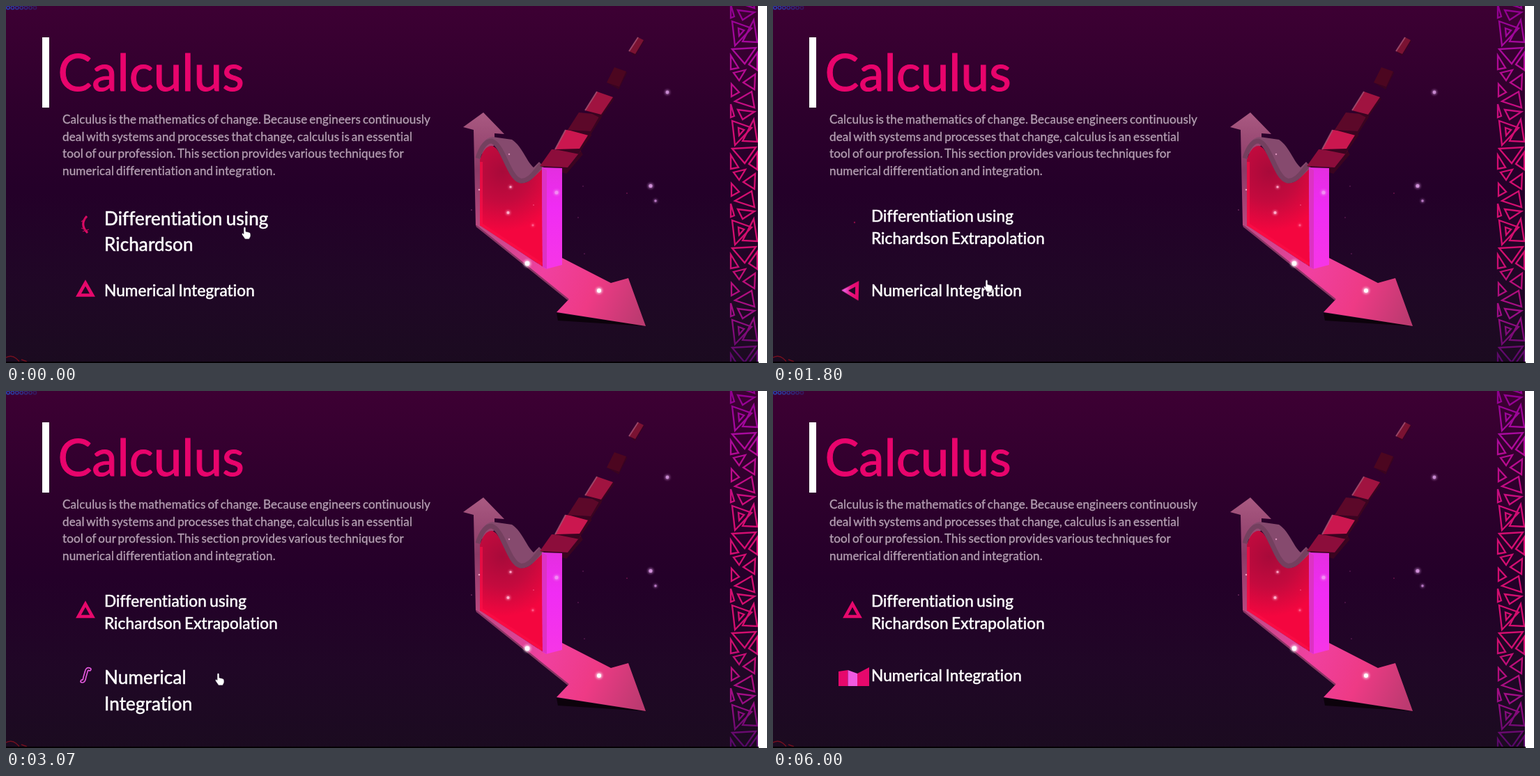
Write an HTML page that moves like this. It is 1092 px wide and 513 px high and loops after 6070 ms.

```html
<!DOCTYPE html>
<html lang="en">
<head>
<meta charset="utf-8">
<title>Calculus</title>
<style>
  html, body { margin: 0; width: 100%; height: 100%; overflow: hidden; background: #fff; }
  svg { display: block; width: 1092px; height: 513px; }
  text { font-family: Lato, "Open Sans", sans-serif; font-variant-ligatures: none; }
  .title { font-size: 73px; fill: #e8046c; stroke: #e8046c; stroke-width: 1.1; }
  .body { font-size: 17.1px; letter-spacing: .1px; word-spacing: -1.5px; fill: #b5a0b3; stroke: #b5a0b3; stroke-width: .3; }
  .item { font-size: 22.6px; letter-spacing: .1px; word-spacing: -1.5px; fill: #fff; stroke: #fff; stroke-width: .55; }
  .big { font-size: 26.1px; }
  .pink { fill: #e6086c; }
  .line { fill: none; stroke: #e6086c; stroke-width: 4.6; }
</style>
</head>
<body>
<svg viewBox="0 0 1092 513">
  <defs>
    <linearGradient id="bg" x2="0" y2="1">
      <stop stop-color="#3d0033"/><stop offset=".3" stop-color="#2d002c"/>
      <stop offset=".52" stop-color="#240029"/><stop offset=".78" stop-color="#200726"/>
      <stop offset="1" stop-color="#1b0b20"/>
    </linearGradient>
    <linearGradient id="strip" gradientUnits="userSpaceOnUse" x1="0" y1="0" x2="0" y2="511">
      <stop stop-color="#9a009c"/><stop offset=".12" stop-color="#b80cae"/>
      <stop offset=".36" stop-color="#ec0f7c"/><stop offset=".7" stop-color="#ec1078"/>
      <stop offset=".86" stop-color="#b00e94"/><stop offset="1" stop-color="#5c0870"/>
    </linearGradient>
    <linearGradient id="axis" gradientUnits="userSpaceOnUse" x1="0" y1="153" x2="0" y2="316">
      <stop stop-color="#aa5a82"/><stop offset=".5" stop-color="#8a3a66"/><stop offset="1" stop-color="#b8487f"/>
    </linearGradient>
    <radialGradient id="panel" gradientUnits="userSpaceOnUse" cx="712" cy="238" r="86">
      <stop stop-color="#a80a3a"/><stop offset=".5" stop-color="#c40a3e"/><stop offset="1" stop-color="#f4063f"/>
    </radialGradient>
    <linearGradient id="base" gradientUnits="userSpaceOnUse" x1="680" y1="330" x2="915" y2="440">
      <stop stop-color="#c04a86"/><stop offset=".4" stop-color="#f040a0"/>
      <stop offset=".7" stop-color="#ee3a85"/><stop offset="1" stop-color="#bc3a70"/>
    </linearGradient>
    <linearGradient id="bar" gradientUnits="userSpaceOnUse" x1="0" y1="232" x2="0" y2="377">
      <stop stop-color="#e42ee0"/><stop offset=".4" stop-color="#f02cf4"/><stop offset="1" stop-color="#f636e6"/>
    </linearGradient>
    <linearGradient id="spin">
      <stop stop-color="#e85ad8"/><stop offset=".5" stop-color="#ea1480"/><stop offset="1" stop-color="#e6086c"/>
    </linearGradient>
    <filter id="soft" x="-1" y="-1" width="3" height="3"><feGaussianBlur stdDeviation="1.6"/></filter>
  </defs>

  <rect width="1080" height="513" fill="url(#bg)"/>
  <g id="corner" fill="none"></g>
  <g id="pattern" fill="none" stroke="url(#strip)" stroke-width="2.3" opacity=".88"></g>
  <rect x="1079" width="13" height="513" fill="#fff"/>
  <rect y="511" width="1080" height="2" fill="#050005"/>

  <rect x="52" y="45" width="10" height="101" fill="#fff"/>
  <text class="title" x="74.5" y="122">Calculus</text>
  <g class="body">
    <text x="81" y="169">Calculus is the mathematics of change. Because engineers continuously</text>
    <text x="81" y="193.5">deal with systems and processes that change, calculus is an essential</text>
    <text x="81" y="218">tool of our profession. This section provides various techniques for</text>
    <text x="81" y="242.5">numerical differentiation and integration.</text>
  </g>

  <g id="art">
    <path fill="url(#axis)" d="M656 174L685 153L715 184L701 183V200L681 214V320L674 315L671 178Z"/>
    <path fill="#864a6e" d="M676 216C681 198 688 189 698 188L726 192C741 202 746 222 757 232L765 224L772 232C758 250 745 256 735 250C722 238 716 205 694 194Z"/>
    <path fill="url(#panel)" d="M680 316V221C684 208 690 200 698 201C713 206 719 250 738 254C752 256 760 242 771 233V375Z"/>
    <path fill="none" stroke="#ff1048" stroke-width="4" opacity=".6" d="M682 224V314L769 371"/>
    <path fill="none" stroke="#74405f" stroke-width="7" d="M677 219C682 202 688 194 697 194C714 200 721 247 738 251C751 253 759 238 768 228"/>
    <path fill="#0c020b" d="M790 441L918 460L792 452Z"/>
    <path fill="url(#base)" d="M674 315L681 316L771 375L798 362L868 398L893 391L918 460L790 440L807 422Z"/>
    <path fill="none" stroke="#8a3564" stroke-width="2.5" d="M675 316L807 422"/>
    <g id="blocks"></g>
    <path fill="url(#bar)" d="M769 232L798 233V372L775 378L770 375Z"/>
    <path fill="#dd32c4" d="M769 232L776 236V378L770 375Z"/>
    <g id="dust"></g>
  </g>

  <g class="item" id="first"><text x="141" y="310">Differentiation using</text><text x="141" y="342">Richardson Extrapolation</text></g>
  <g transform="translate(141 278)"><g class="item big" id="firstBig"><text y="37">Differentiation using</text><text y="74">Richardson</text></g></g>
  <g class="item" id="second"><text x="141" y="417">Numerical Integration</text></g>
  <g transform="translate(141 391)"><g class="item big" id="secondBig"><text y="30">Numerical</text><text y="67.5">Integration</text></g></g>

  <g transform="translate(114 314)">
    <g id="tri1"><path class="line" d="M0 -8L10 10H-10Z"/></g>
    <g id="scribble">
      <path fill="none" stroke="#dc0a64" stroke-width="3" d="M2 -12Q-9 0 3 12"/>
      <path fill="none" stroke="#c00a58" stroke-width="1.2" d="M-6 -4L2 -10M-6 5L3 9M-4 10L5 7"/>
    </g>
    <g id="square"><rect class="pink" x="-6" y="-6" width="12" height="12"/></g>
    <circle id="speck" cx="3" cy="-3" r="1.2" fill="#8a0a44"/>
    <g id="pair">
      <rect class="pink" x="-3" y="-7" width="6" height="6"/>
      <rect class="pink" x="-3" y="2" width="6" height="6"/>
    </g>
  </g>

  <g transform="translate(114 410)">
    <g id="tri2">
      <path class="line" d="M0 -12L10 5.5H-10Z"/>
      <path id="tint" class="line" style="stroke:url(#spin)" transform="rotate(90)" d="M-12 0L5.5 -10V10Z"/>
    </g>
  </g>
  <g id="bars">
    <path class="pink"/><path fill="#f05ae0"/><path class="pink"/>
  </g>
  <g id="integral" fill="none" stroke-linecap="round">
    <path stroke="#e25ade" stroke-width="5.4" d="M109 417Q112 418 113 411L115 404Q116 398 120 400"/>
    <path stroke="#260525" stroke-width="2" d="M109 417Q112 418 113 411L115 404Q116 398 120 400"/>
  </g>

  <g id="cursor">
    <path fill="#fff" stroke="#22102a" stroke-width=".7" d="M3 1.5Q4.5 -.5 6 1.5V7L11 8.2Q13 8.8 13 11V14L11 18H5L.5 11.5Q0 9.5 1.5 9.2L3 10.5Z"/>
  </g>
</svg>
<script>
const LOOP = 6070;
const get = id => document.getElementById(id);

function add(parent, tag, attrs) {
  const el = document.createElementNS('http://www.w3.org/2000/svg', tag);
  for (const key in attrs) el.setAttribute(key, attrs[key]);
  get(parent).append(el);
  return el;
}

// Rows are [milliseconds, style]; the ends are held.
function play(el, rows, easing = 'linear') {
  const all = [...rows];
  const last = rows[rows.length - 1];
  if (rows[0][0] > 0) all.unshift([0, rows[0][1]]);
  if (last[0] < LOOP) all.push([LOOP, last[1]]);
  const run = el.animate(
    all.map(([t, style]) => ({ offset: t / LOOP, easing, ...style })),
    { duration: LOOP, iterations: Infinity });
  run.startTime = 0;
}

// Visible only inside the given [from, to] spans.
function show(id, ...spans) {
  const rows = spans[0][0] > 0 ? [[0, { opacity: 0 }]] : [];
  for (const [from, to] of spans) {
    rows.push([from, { opacity: 1 }]);
    if (to < LOOP) rows.push([to, { opacity: 0 }]);
  }
  play(get(id), rows, 'step-end');
}

const scale = (id, rows, easing) =>
  play(get(id), rows.map(([t, s]) => [t, { transform: `scale(${s})` }]), easing);

// Triangle border, repeated down the edge
const tile = [
  [3, 2, 31, 12, 7, 37], [34, 0, 39, 32, 18, 31], [3, 42, 37, 40, 21, 63],
  [1, 51, 12, 69, 1, 71], [27, 64, 39, 47, 39, 72], [5, 76, 22, 72, 13, 87],
  [19, 90, 36, 78, 35, 100], [2, 92, 13, 104, 2, 110], [7, 117, 31, 103, 35, 126],
  [11, 129, 35, 132, 18, 143], [1, 121, 6, 138, 1, 140], [12, 12, 20, 15, 13, 23]
];
for (let top = -123; top < 511; top += 143)
  for (const [a, b, c, d, e, f] of tile)
    add('pattern', 'path', {
      d: `M${1039 + a} ${top + b}L${1039 + c} ${top + d}L${1039 + e} ${top + f}Z`
    });

for (let i = 0; i < 7; i++)
  add('corner', 'circle', { cx: 3 + i * 6.4, cy: 2.5, r: 2.2, stroke: '#2947b0', 'stroke-width': 1.6, opacity: .95 - i * .1 });
add('corner', 'path', { d: 'M0 505Q8 501 14 506T18 511M22 508L30 511', stroke: '#74101f', 'stroke-width': 1.5 });

// Blocks: four top corners and a colour
const blocks = [
  [783, 206, 825, 208, 806, 232, 766, 230, '#8c0d3b'],
  [803, 178, 838, 181, 823, 205, 788, 206, '#cb174f'],
  [822, 153, 853, 156, 839, 180, 806, 178, '#5c0829'],
  [848, 123, 871, 131, 854, 156, 831, 150, '#a01340'],
  [873, 88, 890, 94, 880, 116, 862, 110, '#4c0620'],
  [907, 45, 915, 49, 903, 69, 894, 65, '#7a1232']
];
blocks.forEach(([a, b, c, d, e, f, g, h, fill], i) => {
  const k = 9 - i * 1.3;
  add('blocks', 'path', { fill: '#3a0420', d: `M${c} ${d}l${k * .3} ${k * .6}L${e - k * .2} ${f + k}L${g} ${h}L${e} ${f}Z` });
  add('blocks', 'path', { fill, d: `M${a} ${b}L${c} ${d}L${e} ${f}L${g} ${h}Z` });
  if (i % 2) add('blocks', 'path', { stroke: '#a85474', 'stroke-width': 2, opacity: .8, d: `M${a} ${b}L${g} ${h}` });
});

const dust = [
  [949, 124, 2.8, '#c78ad0'], [925, 258.5, 3, '#cf8fd8'], [932, 280, 2, '#b878c4'],
  [851, 409, 3.6, '#fff'], [748, 370, 4, '#fff'], [720.5, 297, 2.4, '#ffb0cc'],
  [724, 260, 1.9, '#ffa8c8'], [679, 264, 1.5, '#f0a0c0'], [722, 213, 1.5, '#d890b8'],
  [790, 268, 3, '#f48cf4'], [756, 315, 1.8, '#ff5a88'], [757, 286, 1.1, '#f04070'],
  [828, 259, .9, '#7a2a6a'], [891, 269, 1, '#8a1a58'], [821, 304, .9, '#7a2a6a'],
  [830, 356, .9, '#7a2a6a'], [668, 293, 1, '#8a3a72']
];
for (const [cx, cy, r, fill] of dust) {
  if (r > 1.6) add('dust', 'circle', { cx, cy, r: r * 1.35, fill, opacity: .6, filter: 'url(#soft)' });
  add('dust', 'circle', { cx, cy, r: r * .85, fill });
}

// Menu items
const small = .866;
show('firstBig', [0, 1600]);
show('first', [1600, LOOP]);
scale('firstBig', [[1330, 1], [1600, small]], 'ease-in-out');
show('second', [0, 1930], [5470, LOOP]);
show('secondBig', [1930, 5470]);
scale('secondBig', [[1930, .9], [2130, 1], [5270, 1], [5470, .9]], 'ease-in-out');

// First icon
show('scribble', [0, 200], [1500, 1730]);
show('square', [200, 1500]);
scale('square', [[200, .3], [400, 1], [1370, 1], [1500, .3]]);
show('speck', [1730, 1900]);
show('pair', [2070, 2400]);
scale('pair', [[2070, .3], [2180, 1], [2260, 1], [2400, .4]]);
show('tri1', [2400, LOOP]);
scale('tri1', [[2400, .3], [2600, 1]], 'ease-out');

// Second icon
show('tri2', [0, 2000]);
show('tint', [1740, 2000]);
play(get('tri2'), [
  [1670, { transform: 'translate(0px, 0px) rotate(0deg)' }],
  [1800, { transform: 'translate(1px, -1px) rotate(-88deg)' }],
  [1880, { transform: 'translate(1px, -1px) rotate(-120deg)' }],
  [2000, { transform: 'translate(0px, -3px) rotate(-150deg) scale(1, .3)' }]
]);

const xs = [94, 107.5, 121, 138];
const thin = [[408, 402, 405, 396.5], [413, 405, 409, 400]];
const full = [[403, 401, 406, 397], [424, 424, 424, 424]];
const slab = ([top, low], i) => ({
  d: `path("M${xs[i]} ${top[i]}L${xs[i + 1]} ${top[i + 1]}L${xs[i + 1]} ${low[i + 1]}L${xs[i]} ${low[i]}Z")`
});
[...get('bars').children].forEach((bar, i) => play(bar, [
  [2260, slab(thin, i)], [2470, slab(full, i)]
], 'ease-in-out'));
show('bars', [2000, 2700], [5600, LOOP]);
play(get('integral'), [
  [2700, { opacity: 0 }], [2870, { opacity: 1 }],
  [5400, { opacity: 1 }], [5600, { opacity: 0 }]
]);

// Pointer
const at = (x, y) => ({ transform: `translate(${x}px, ${y}px)` });
play(get('cursor'), [
  [0, at(338, 317)], [400, at(334.5, 317)], [1270, at(334.5, 317)],
  [1530, at(318, 355)], [1800, at(302, 393)], [2000, at(300, 405)]
]);
show('cursor', [0, 5270]);
</script>
</body>
</html>
```
